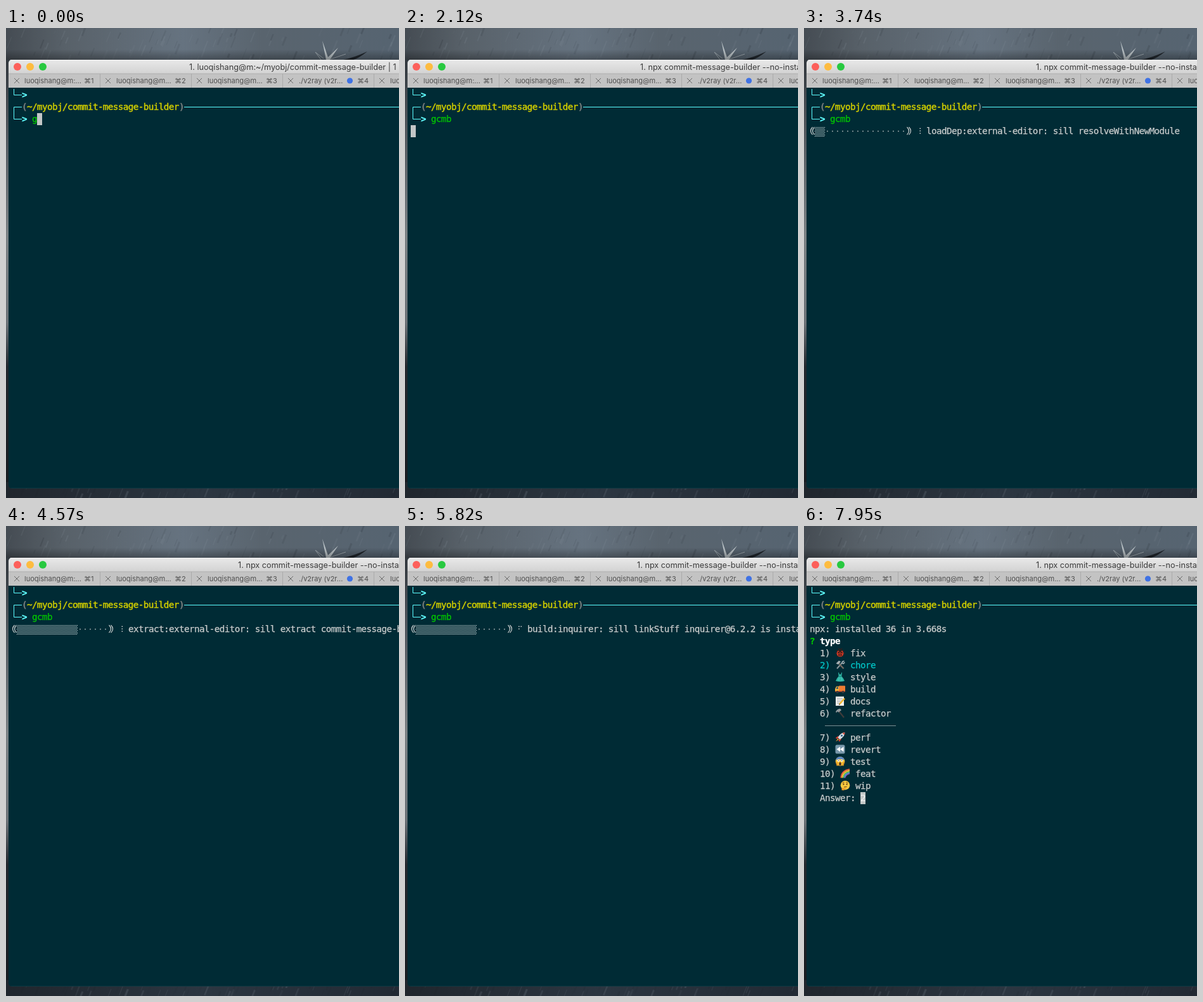
Recreate the animation shown at these times as an HTML page. Size 620x740 px, loop 8000 ms.

```html
<!DOCTYPE html>
<html lang="en">
<head>
<meta charset="utf-8">
<title>Terminal</title>
<style>
  html, body { margin: 0; width: 620px; height: 740px; overflow: hidden; background: #39424b; }
  svg { display: block; }
  text { white-space: pre; fill: currentColor; }
  .mono { font: 14.2px "DejaVu Sans Mono", monospace; letter-spacing: -.55px; stroke: currentColor; stroke-width: .25; }
  .ui { font: 12.7px Inter, "DejaVu Sans", sans-serif; }
  .tab { font: 11px Inter, "DejaVu Sans", sans-serif; }
</style>
</head>
<body>
<svg id="stage" width="620" height="740" viewBox="0 0 620 740">
  <defs>
    <linearGradient id="sky">
      <stop offset="0" stop-color="#454c53"/><stop offset=".15" stop-color="#586169"/>
      <stop offset=".45" stop-color="#667380"/><stop offset=".65" stop-color="#59646e"/>
      <stop offset="1" stop-color="#566471"/>
    </linearGradient>
    <linearGradient id="edge" x2="0" y2="1">
      <stop offset="0" stop-color="#33393f"/><stop offset=".2" stop-color="#585e64"/>
      <stop offset=".4" stop-color="#7b8184"/><stop offset=".6" stop-color="#6c7277"/>
      <stop offset=".7" stop-color="#23282e"/><stop offset="1" stop-color="#171b20"/>
    </linearGradient>
    <linearGradient id="floor">
      <stop offset="0" stop-color="#20262d"/><stop offset=".5" stop-color="#2c3641"/>
      <stop offset="1" stop-color="#222a34"/>
    </linearGradient>
    <linearGradient id="bar" x2="0" y2="1">
      <stop offset="0" stop-color="#e9e9e9"/><stop offset="1" stop-color="#d2d2d2"/>
    </linearGradient>
    <linearGradient id="shade" x2="0" y2="1">
      <stop offset="0" stop-opacity="0"/><stop offset="1" stop-opacity=".3"/>
    </linearGradient>
    <pattern id="dither" width="2" height="4" patternUnits="userSpaceOnUse">
      <path d="M0 0h1v1h-1zM1 2h1v1h-1z" fill="#f0f3f3"/>
    </pattern>
    <clipPath id="win"><rect x="4" y="50" width="640" height="675" rx="5"/></clipPath>
  </defs>
  <rect width="620" height="60" fill="url(#sky)"/>
  <rect y="50" width="8" height="690" fill="url(#edge)"/>
  <rect y="715" width="620" height="25" fill="url(#floor)"/>
  <g id="rain"></g>
  <path d="M505 50L499 20L508 46L524 31L511 50Z" fill="#bac2c6"/>
  <path d="M497 50L488 38L501 48M512 49L536 41" fill="none" stroke="#9ca6ac"/>
  <path d="M532 50Q548 47 570 37Q556 48 548 50Z" fill="#20262c"/>
  <rect y="34" width="620" height="16" fill="url(#shade)"/>
  <g id="window" clip-path="url(#win)">
    <rect x="4" y="50" width="616" height="675" fill="#002b35"/>
    <rect x="4" y="50" width="616" height="22" fill="url(#bar)"/>
    <rect x="4" y="50" width="616" height="1" fill="#f4f4f4"/>
    <rect x="4" y="72" width="616" height="22" fill="#c3c3c3"/>
    <rect x="4" y="71.5" width="616" height="1" fill="#b0b0b0"/>
    <circle cx="18" cy="61" r="6" fill="#fc605b"/>
    <circle cx="38" cy="61" r="6" fill="#fdbc40"/>
    <circle cx="58" cy="61" r="6" fill="#28c940"/>
    <path d="M4 724.5H620" stroke="#0d3842" fill="none"/>
  </g>
</svg>
<script>
const LOOP = 8000, COL = 8, ROW = 19, LEFT = 9, TOP = 96;
const FG = '#c9cccc', CYAN = '#00c5c7', GREEN = '#00c800', YELLOW = '#cdca00', LINE = '#60fdff';
const user = 'luoqishang';
const repo = '~/myobj/commit-message-builder';
const win = document.getElementById('window');

function add(tag, attrs, parent = win) {
  const el = document.createElementNS('http://www.w3.org/2000/svg', tag);
  for (const k in attrs) el.setAttribute(k, attrs[k]);
  parent.appendChild(el);
  return el;
}
function label(x, y, str, cls, color, parent) {
  const el = add('text', { x, y, class: cls, color }, parent);
  el.textContent = str;
  return el;
}
const cx = col => LEFT + col * COL;
const cy = row => TOP + row * ROW;
const print = (col, row, str, color = FG, parent = win) =>
  label(cx(col), cy(row) + 14, str, 'mono', color, parent);
const bold = el => { el.style.fontWeight = 'bold'; return el; };
const show = (el, on) => el.setAttribute('visibility', on ? 'inherit' : 'hidden');

// Wallpaper streaks
let seed = 11;
const rnd = () => (seed = seed * 16807 % 2147483647) / 2147483647;
const rain = document.getElementById('rain');
for (let i = 0; i < 150; i++) {
  const low = i > 85, x = rnd() * 640, y = low ? 716 + rnd() * 18 : rnd() * 48 - 4, n = 5 + rnd() * 14;
  add('path', {
    d: `M${x} ${y}l${-n * .4} ${n}`, stroke: rnd() < .55 ? '#8e9aa5' : '#1d232a',
    'stroke-width': .8 + rnd() * 2.4, opacity: .05 + rnd() * .13
  }, rain);
}

// Tab bar
const tabs = [user + '@m:...', user + '@m...', user + '@m...', './v2ray (v2r...', user];
tabs.forEach((name, i) => {
  const x = 4 + i * 144;
  add('path', { d: `M${x + 9} 79l8 8m0-8l-8 8`, stroke: '#6b6b6b', fill: 'none' });
  label(x + (i ? 26 : 25), 87, name, 'tab', '#505050');
  if (i < 4) {
    label(x + (i ? 118 : 119), 87, '⌘' + (i + 1), 'tab', '#505050');
    add('path', { d: `M${x + 144.5} 72v22`, stroke: '#aaa' });
  }
});
add('circle', { cx: 542.5, cy: 83, r: 4.6, fill: '#3f72e4' });

// Prompt
add('path', {
  d: 'M12.5 96V105.5H25M25 124.5H12.5V143.5H25M281 124.5H620',
  fill: 'none', stroke: LINE
});
bold(print(2, 0, '>', LINE));
bold(print(2, 2, '>', LINE));
bold(print(2, 1, '(', '#757b7b'));
print(3, 1, repo, YELLOW).style.strokeWidth = .5;
bold(print(33, 1, ')', '#757b7b'));

const title = label(0, 66, '', 'ui', '#3c3c3c');
const command = print(4, 2, '', GREEN);
const cursor = add('rect', { width: 8, height: 19, fill: '#c3c7c7' });

// npm progress line
const progress = add('g', {});
const arcs = 'M13.5 156q-6 6 0 12M16.5 156q-6 6 0 12M162.5 156q6 6 0 12M165.5 156q6 6 0 12';
add('path', { d: arcs, fill: 'none', stroke: FG, 'stroke-width': 1.2 }, progress);
const dots = add('path', { fill: 'none', stroke: FG, 'stroke-width': 1.5, 'stroke-dasharray': '1.5 6.5' }, progress);
const fill = add('rect', { x: 17, y: 155, height: 16, fill: 'url(#dither)' }, progress);
const spinner = add('path', { fill: FG }, progress);
const task = print(23, 3, '', FG, progress);

function setProgress([count, pins, str]) {
  fill.setAttribute('width', count * COL);
  dots.setAttribute('d', `M${17 + count * COL + 3.2} 162.5H161`);
  // Braille pins 1-3 run down the left side, 4-6 down the right
  spinner.setAttribute('d', [...pins].map(p =>
    `M${p > 3 ? 182.5 : 179} ${157.5 + (p - 1) % 3 * 3.7}h1.6v1.6h-1.6z`).join(''));
  task.textContent = str;
}

// Menu
const icons = {
  fix: `<path d="M2 4l3 2M1 9h3M3 14l3-3M14 4l-3 2M15 9h-3M13 14l-3-3M5 1l2 3M11 1l-2 3" stroke="#3a1c18" stroke-width="1.2"/>
    <circle cx="8" cy="9" r="5.4" fill="#d63a26"/><circle cx="8" cy="4.3" r="2.6" fill="#2b2020"/>
    <path d="M8 5v9" stroke="#3a1c18"/><g fill="#2b1614"><circle cx="5.5" cy="8" r="1.2"/><circle cx="10.5" cy="8" r="1.2"/>
    <circle cx="6" cy="11.6" r="1.1"/><circle cx="10" cy="11.6" r="1.1"/></g>`,
  chore: `<path d="M3 14L11 5" stroke="#8b969b" stroke-width="2"/><path d="M14.5 2l-3 1.2l-.5 2l2 1l2.3-2" fill="none" stroke="#a9b3b7" stroke-width="1.6"/>
    <path d="M6 6l7.5 8" stroke="#776a61" stroke-width="2.2"/><path d="M1.5 6L6 1.5L9 3L5 7.5Z" fill="#a7b0b4"/>`,
  style: `<path d="M6 1l.6 3h2.8L10 1l1 .5l-.7 5.5Q14 11 15 14.5Q8 16.5 1 14.5Q2 11 5.7 7L5 1.5Z" fill="#2fb5a5"/>
    <path d="M5.7 7.3h4.6" stroke="#157e77"/><path d="M7 9l-2 5M9.5 9l1.5 5" stroke="#62d4c4" stroke-width=".7"/>`,
  build: `<rect x="6" y="3" width="10" height="9" rx="1" fill="#ef7d32"/><path d="M0 12V8l2-4h4v8z" fill="#f7b43b"/>
    <path d="M1.5 8l1.3-3H5v3z" fill="#365669"/><path d="M0 12h16" stroke="#b5432d" stroke-width="1.5"/>
    <circle cx="3.7" cy="13" r="2" fill="#39393c"/><circle cx="12.5" cy="13" r="2" fill="#39393c"/>`,
  docs: `<rect x="1" y="1" width="13" height="14.5" fill="#f2f2ee"/><path d="M3 4h9M3 6.5h9M3 9h7M3 11.5h6" stroke="#a8b0b5"/>
    <path d="M7 13L15 4" stroke="#f1b52c" stroke-width="2.4"/><path d="M6 14.5l.4-2.5l1.7 1.6z" fill="#52443a"/>`,
  refactor: `<path d="M6 5l8 10" stroke="#403c3b" stroke-width="2.2"/><path d="M1 6Q3 1.5 8 1l2 2.5L5.5 7L4 5.5L2 7.5Z" fill="#8e989c"/>`,
  perf: `<path d="M5 6L1 9l1 1.5l4-1M10 11l-3 4l-1.5-1l1-4" fill="#d6402f"/>
    <path d="M15.5.5Q9 .5 4.5 8.5L7.5 11.5Q15.5 7 15.5.5Z" fill="#d5dde3"/><path d="M15.5.5l-4 1l3 3z" fill="#d6402f"/>
    <circle cx="10.5" cy="5.5" r="1.6" fill="#30648b"/><path d="M1 15l3.5-5l1.5 1.5z" fill="#f6a52d"/>`,
  revert: `<rect x=".5" y="1" width="15" height="14" rx="2.5" fill="#7897aa"/><path d="M8 4v8L2.5 8zM13.5 4v8L8 8z" fill="#fff"/>`,
  test: `<circle cx="8" cy="8" r="7.3" fill="#f6c43c"/><path d="M1 6a7.3 7.3 0 0 1 14 0Q8 3 1 6Z" fill="#5a87c4"/>
    <circle cx="5.4" cy="6.8" r="1.9" fill="#fff"/><circle cx="10.6" cy="6.8" r="1.9" fill="#fff"/>
    <circle cx="5.4" cy="6.8" r=".7" fill="#333"/><circle cx="10.6" cy="6.8" r=".7" fill="#333"/>
    <ellipse cx="8" cy="12" rx="1.8" ry="2.7" fill="#53301c"/><path d="M2.3 9l1.5 6M13.7 9l-1.5 6" stroke="#e89a25" stroke-width="2.4"/>`,
  feat: ['#e84b3f', '#f59a35', '#f5d746', '#59bd59', '#469de0', '#8d62be'].map((c, i) =>
    `<path d="M${1 + i * 1.35} 15Q${2 + i * 1.3} ${3 + i * 1.35} 15 ${1.2 + i * 1.4}" stroke="${c}" stroke-width="1.5"/>`).join(''),
  wip: `<circle cx="8" cy="7.7" r="7.3" fill="#f9c93f"/><circle cx="5.4" cy="6.2" r="1.1" fill="#5b3715"/><circle cx="10.6" cy="6.2" r="1.1" fill="#5b3715"/>
    <path d="M3.5 4l3-.8M9.3 3l3 1M6 10.5l4.5-.6" stroke="#6d4318"/><path d="M2.5 15.5V11l2 1.5l5-1l.3 1.2l-3 1l-.5 2Z" fill="#e99b27"/>`
};
const installed = print(0, 3, 'npx: installed 36 in 3.668s');
const menu = add('g', {});
bold(print(0, 4, '?', GREEN, menu));
bold(print(2, 4, 'type', '#fff', menu));
const items = Object.keys(icons).map((name, i) => {
  const row = i < 6 ? 5 + i : 6 + i, shift = i < 9 ? 0 : 1;
  const parts = [print(2, row, `${i + 1})`, FG, menu), print(8 + shift, row, name, FG, menu)];
  add('g', { transform: `translate(${cx(5 + shift)} ${cy(row) + .5})`, fill: 'none' }, menu).innerHTML = icons[name];
  return parts;
});
add('path', { d: 'M33 314.5H145', stroke: '#7b8e92' }, menu);
print(2, 17, 'Answer:', FG, menu);
const answer = print(10, 17, '', '#eceeee', menu);

// Timeline: each step changes part of the state
const titles = {
  shell: [289, `1. ${user}@m:${repo} | 1`],
  npx: [371, '1. npx commit-message-builder --no-install'],
  node: [366, '1. npx commit-message-builder --no-install']
};
const steps = [
  [0, { title: 'shell', cmd: 'g', cursor: [5, 2], pick: 0 }],
  [900, { cmd: 'gc', cursor: [6, 2] }],
  [1160, { cmd: 'gcm', cursor: [7, 2] }],
  [1340, { cmd: 'gcmb', cursor: [8, 2] }],
  [2060, { cursor: [0, 3] }],
  [2120, { title: 'npx' }],
  [2870, { title: 'node' }],
  [3530, { cursor: null, npm: [0, '1236', 'rollbackFailedOptional: verb npm-session 7cc382d64c9e3'] }],
  [3620, { npm: [0, '236', 'fetchMetadata: sill resolveWithNewModule inquirer@6.2.2'] }],
  [3680, { npm: [1, '145', 'fetchMetadata: sill resolveWithNewModule rxjs@6.4.0'] }],
  [3740, { npm: [2, '456', 'loadDep:external-editor: sill resolveWithNewModule'] }],
  [3920, { npm: [7, '456', 'loadDep:iconv-lite: sill resolveWithNewModule iconv-lite'] }],
  [4570, { npm: [12, '456', 'extract:external-editor: sill extract commit-message-builder'] }],
  [4660, { npm: [12, '236', 'extract:rxjs: sill extract inquirer@6.2.2 extracted to'] }],
  [5080, { npm: [12, '236', 'extract:lodash: sill extract rxjs@6.4.0 extracted to'] }],
  [5650, { npm: [12, '145', 'extract:lodash: sill extract lodash@4.17.11 extracted'] }],
  [5760, { npm: [12, '1236', 'finalize:inquirer: sill finalize inquirer@6.2.2'] }],
  [5820, { npm: [12, '124', 'build:inquirer: sill linkStuff inquirer@6.2.2 is installed'] }],
  [5880, { npm: null, done: true, cursor: [0, 4] }],
  [6120, { menu: true, cursor: [10, 17] }],
  [7410, { pick: 1, answer: '2' }],
  [7530, { pick: 2, answer: '3' }],
  [7950, { pick: 1, answer: '2' }]
];
const states = [];
for (const [at, change] of steps) states.push({ ...states[states.length - 1], ...change, at });

function render(s) {
  const [x, str] = titles[s.title];
  title.setAttribute('x', x);
  title.textContent = str;
  command.textContent = s.cmd;
  show(cursor, s.cursor);
  if (s.cursor) {
    cursor.setAttribute('x', cx(s.cursor[0]));
    cursor.setAttribute('y', cy(s.cursor[1]));
  }
  show(progress, s.npm);
  if (s.npm) setProgress(s.npm);
  show(installed, s.done);
  show(menu, s.menu);
  items.forEach((parts, i) => parts.forEach(p => p.setAttribute('color', i === s.pick ? CYAN : FG)));
  answer.textContent = s.answer || '';
}

let current;
const start = performance.now();
function tick() {
  const t = (performance.now() - start) % LOOP;
  const state = states.filter(s => s.at <= t).pop();
  if (state !== current) render(current = state);
  requestAnimationFrame(tick);
}
tick();
</script>
</body>
</html>
```
